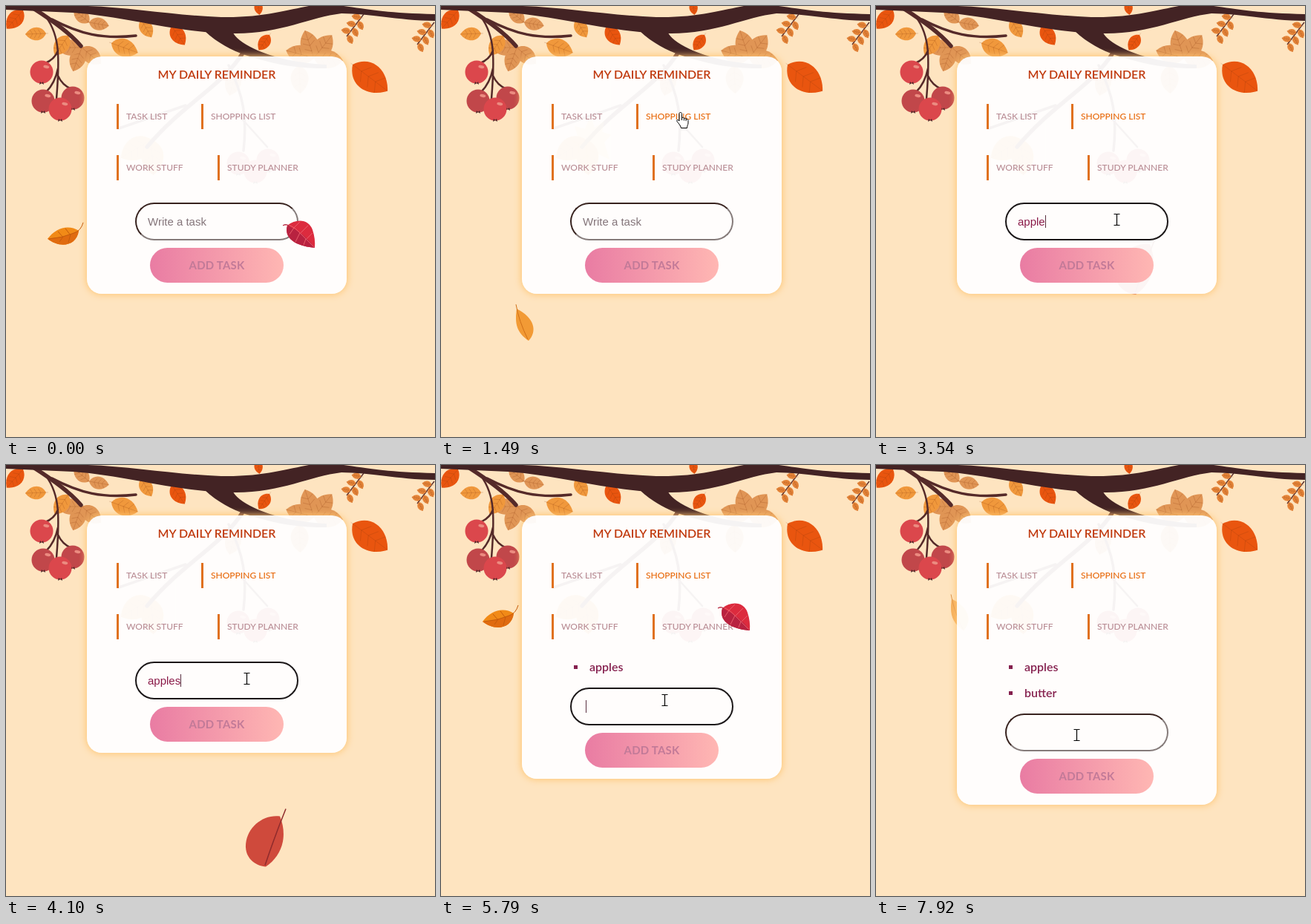
Animation, 578 px wide and 581 px high, one loop 7.99 s. Source, as an HTML page:

```html
<!DOCTYPE html>
<html lang="en">
<head>
<meta charset="utf-8">
<title>Daily reminder</title>
<style>
html, body { margin: 0; width: 100%; height: 100%; overflow: hidden; background: #fee4c0; }
body { position: relative; font-family: Lato, sans-serif; }
body > *, #form > * { position: absolute; box-sizing: border-box; white-space: nowrap; }
svg { left: 0; top: 0; width: 578px; height: 581px; overflow: hidden; }

#card { left: 109px; top: 68px; width: 350px; height: 320px; border-radius: 20px;
  background: rgba(255, 255, 255, .945); box-shadow: 0 0 10px 1px #ffc673; }
h1 { margin: 0; left: 109px; top: 80px; width: 350px; text-align: center;
  font-size: 16px; line-height: 24px; font-weight: 600; color: #c0390d; }
.tab { height: 34px; padding-left: 10px; border-left: 3px solid #e0711f;
  font-size: 12px; line-height: 34px; font-weight: 500; color: #b98d95; }
.tab.on { color: #e8690b; }

.item { left: 200px; font-size: 16px; line-height: 24px; font-weight: 600; color: #85204e; }
.item::before { content: ""; position: absolute; left: -21px; top: 10px; width: 5px; height: 5px; background: #85204e; }

#form { left: 0; top: 265px; }
#field { left: 174px; top: 0; width: 220px; height: 51px; padding-left: 15px; border-radius: 26px;
  border: 2px solid; border-color: #38231f #857b7a #857b7a #38231f;
  font: 15px/47px "Liberation Sans", Arial, sans-serif; color: #8a1a48; }
#field.focus { border-color: #1b1718; }
#hint { position: absolute; color: #84757a; }
#text.wavy { text-decoration: underline wavy #d83a4c 1px; text-underline-offset: 1px; }
#caret { display: inline-block; width: 1px; height: 17px; margin-right: -1px; vertical-align: -3px; background: #5a3040; }
#button { left: 194px; top: 61px; width: 180px; height: 47px; border-radius: 24px; text-align: center;
  font-size: 15px; line-height: 47px; font-weight: 700; letter-spacing: .2px; color: #c27a98;
  background: linear-gradient(90deg, #e97ca3, #ffb7b3); }
#button.hover { color: #ad5885; background: linear-gradient(90deg, #e56a9a, #ffb0a9); }
</style>
</head>
<body>
<svg viewBox="0 0 578 581">
  <g id="foliage"></g>
  <g fill="none" stroke="#552a29" stroke-linecap="round">
    <path stroke-width="5.5" d="M35 2C60 18 85 35 101 54M320 62C290 110 240 130 190 190"/>
    <path stroke-width="3.5" d="M62 18C100 38 130 45 175 40M242 134L152 165M300 80C320 120 325 150 320 195"/>
    <path stroke-width="2.5" d="M50 10C72 35 73 65 68 125M70 60Q66 72 51 78M70 84Q66 104 54 116M69 92Q76 108 89 112M316 150L352 190"/>
  </g>
  <g fill="#432324">
    <path d="M0 0H110C170 2 230 13 290 15C345 16 380 5 408 0H455C480 3 510 10 578 11V20C530 20 490 10 452 10C410 15 370 37 310 37C230 37 170 15 90 9L0 5Z"/>
    <path d="M268 34C285 50 305 60 322 66C370 82 400 84 432 84V79C400 78 360 70 335 58C318 50 308 42 305 34Z"/>
  </g>
  <g id="berries"></g>
  <g id="slim">
    <path fill="#f29a35" d="M102 158C99 178 102 190 118 201C130 188 126 170 102 158Z"/>
    <path fill="none" stroke="#cf6f18" d="M101 152Q105 175 117 199"/>
  </g>
  <path id="maple" fill="#f9a021" d="M201 335L207 350L220 342L217 356L229 360L220 370L227 393L212 386L193 402L190 388L178 397L180 380L172 368L184 362L180 348L194 352Z"/>
  <g id="broad">
    <path fill="#cf4a3c" d="M369 163C345 160 322 180 323 205C324 222 338 230 350 231C372 216 380 190 369 163Z"/>
    <path fill="none" stroke="#8f2b2c" stroke-width="1.5" d="M377 153Q362 190 349 229"/>
  </g>
</svg>

<div id="card"></div>
<h1>MY DAILY REMINDER</h1>
<div class="tab" style="left:149px;top:132px">TASK LIST</div>
<div class="tab" id="shopping" style="left:263px;top:132px">SHOPPING LIST</div>
<div class="tab" style="left:149px;top:201px">WORK STUFF</div>
<div class="tab" style="left:285px;top:201px">STUDY PLANNER</div>
<div class="item" style="top:260px">apples</div>
<div class="item" style="top:295px">butter</div>
<div id="form">
  <div id="field"><span id="hint">Write a task</span><span id="text"></span><span id="caret"></span></div>
  <div id="button">ADD TASK</div>
</div>

<svg viewBox="0 0 578 581">
  <g id="pair" fill="none">
    <path fill="#f18a17" d="M98 303C84 294 67 299 56 314C70 326 95 326 98 303Z"/>
    <path fill="#e06b10" d="M98 303Q80 312 56 314C70 326 95 326 98 303Z"/>
    <path stroke="#c55c0c" d="M104 292Q101 303 92 306Q76 313 58 314M86 308L80 300M76 311L70 304M87 308L84 319M77 311L72 318"/>
    <path fill="#dc2b3e" d="M379 296C393 285 409 289 413 302Q417 314 416 326C398 325 373 317 379 296Z"/>
    <path fill="#b82240" d="M379 296Q402 306 416 326C398 325 373 317 379 296Z"/>
    <path stroke="#ee6570" stroke-width=".9" d="M373 296Q383 292 396 306L415 325M388 299L396 291M397 306L407 296M405 314L413 306M388 299L382 308M396 306L390 318M404 314L401 322"/>
    <path stroke="#a51f3a" d="M373 296Q377 293 382 297"/>
  </g>
  <g id="pointer" stroke="#000" fill="#fff">
    <path id="arrow" d="M0 0V16L4 12.5L6.5 18.5L9 17.5L6.5 11.5H12Z"/>
    <path id="hand" transform="translate(-5)" d="M5.5 .5C7 .5 7.5 1.3 7.5 2.5V7.5C8.5 7 10 7.2 10.3 8.3C11.5 7.8 13 8.3 13.1 9.4C14.5 9 16 10 16 11.5V15C16 17 14.5 18 14.5 21.5H6.5C6 18 3 15.5 1 12.5C0 11 1.8 9.8 3.2 11L4 12V2.5C4 1.3 4.2 .5 5.5 .5ZM7.5 7V11M10.4 8V11.5M13.1 9V12"/>
    <path id="beam" fill="none" stroke-width="1.2" d="M-4-7.5h3q1 0 1 1q0-1 1-1h3M0-7V7M-4 7.5h3q1 0 1-1q0 1 1 1h3"/>
  </g>
</svg>

<script>
const LOOP = 7990;
const ROW = 35;
const $ = id => document.getElementById(id);
const clamp = v => Math.min(1, Math.max(0, v));
const smooth = v => v * v * (3 - 2 * v);
const show = (el, on) => { el.style.visibility = on ? 'visible' : 'hidden'; };

// One leaf growing from (x, y) in a direction given in degrees.
function leaf(x, y, angle, length, color) {
  const w = length * .42, vein = [.25, .45, .65].map(a =>
    `M${length * (a + .13)} ${w * .5}L${length * a} 0L${length * (a + .13)} ${-w * .5}`).join('');
  $('foliage').insertAdjacentHTML('beforeend', `<g transform="translate(${x} ${y}) rotate(${angle})">
    <path fill="${color}" d="M0 0C${length * .2} ${w} ${length * .7} ${w} ${length} 0C${length * .7} ${-w} ${length * .2} ${-w} 0 0"/>
    <path fill="none" stroke="#8a3a10" stroke-opacity=".3" stroke-width=".7" d="M-3 0H${length}${vein}"/></g>`);
}

function fan(x, y, angle, spread, count, length, color) {
  for (let i = 0; i < count; i++) leaf(x, y, angle + spread * (i / (count - 1) - .5), length, color);
}

// Thin hanging twig with leaves on alternating sides.
function sprig(x, y) {
  $('foliage').insertAdjacentHTML('beforeend',
    `<path d="M${x} ${y}l-23 30" fill="none" stroke="#552a29" stroke-width="1.3"/>`);
  for (let i = 1; i <= 6; i++) leaf(x - 3.5 * i, y + 4.7 * i, i % 2 ? 190 : 65, 13, '#e8873a');
}

const TAN = '#e09555', AMBER = '#f0983c', RED = '#e9550f';
fan(112, 22, -65, 150, 2, 27, TAN);
fan(102, 56, 110, 140, 3, 34, TAN);
fan(415, 70, -80, 170, 4, 39, TAN);
leaf(395, 80, 88, 38, TAN);
leaf(310, 88, 105, 34, TAN);
leaf(54, 37, 178, 28, AMBER);
leaf(84, 40, 125, 32, AMBER);
leaf(142, 50, 20, 38, AMBER);
leaf(182, 18, 60, 28, AMBER);
fan(196, 180, 118, 62, 2, 48, AMBER);
leaf(23, 6, 132, 33, RED);
leaf(223, 27, 55, 31, RED);
leaf(355, 39, 125, 25, RED);
leaf(339, -6, 82, 18, RED);
leaf(467, 79, 37, 59, RED);
sprig(482, 11);
sprig(577, 22);

function berry(x, y, color) {
  $('berries').insertAdjacentHTML('beforeend', `<g transform="translate(${x} ${y})">
    <circle r="15.5" fill="${color}"/><ellipse cx="5" cy="-8" rx="4" ry="2" fill="#eb8b80" transform="rotate(10)"/>
    <path d="M-3 17l1-4l2 2l2-2l1 4l-3-2z" fill="#432324"/></g>`);
}
function bunch(x, y) {
  for (const side of [-1, 1]) berry(x + 20 * side, y - 2 * side, '#c1474a');
  berry(x + 3, y + 13, '#db474c');
}
berry(48, 89, '#db474c');
bunch(70, 126);
bunch(333, 210);

// Leaves drop with constant acceleration, from `lift` above the drawn pose, fading in after `wait`.
const falling = {
  pair: { starts: [-1492, 4654], lift: 245, wait: 800 },
  slim: { starts: [-240, 6960], lift: 79, wait: 800 },
  maple: { starts: [1100], lift: 203, wait: 300 },
  broad: { starts: [2050], lift: 13, wait: 0, pull: 7.7e-5 }
};
function drop(name, t) {
  const { starts, lift, wait, pull = 1.1e-4 } = falling[name];
  const age = t - (starts.findLast(s => s <= t) ?? Infinity);
  $(name).style.opacity = clamp((age - wait) / 220);
  $(name).setAttribute('transform', `translate(0 ${age > 0 ? pull * age * age - lift : 0})`);
}

const KEY_GAP = 172;
const tasks = [
  { word: 'apples', focus: 2260, type: 2845, add: 4890 },
  { word: 'butter', focus: 5650, type: 5950, add: 7750 }
];

const moves = [
  { at: 100, time: 380, x: 322, y: 143 },
  { at: 1700, time: 400, x: 324.5, y: 288 },
  { at: 4170, time: 280, x: 293, y: 365 },
  { at: 4990, time: 260, x: 301.5, y: 317 },
  { at: 7230, time: 320, x: 270.5, y: 364 }
];
function pointerAt(t) {
  let x = 590, y = 100;
  for (const m of moves) {
    const k = smooth(clamp((t - m.at) / m.time));
    x += (m.x - x) * k;
    y += (m.y - y) * k;
  }
  return [x, y];
}
function over(id, x, y) {
  const box = $(id).getBoundingClientRect();
  return x >= box.left && x <= box.right && y >= box.top && y <= box.bottom;
}

function render(t) {
  const count = tasks.filter(task => t >= task.add).length;
  const task = tasks[count];
  const focused = !!task && t >= task.focus;
  const keys = task ? Math.min(task.word.length, Math.max(0, Math.floor((t - task.type) / KEY_GAP) + 1)) : 0;
  const idle = !task ? 0 : t - (keys ? task.type + (keys - 1) * KEY_GAP : task.focus);

  $('card').style.height = 320 + ROW * count + 'px';
  $('form').style.top = 265 + ROW * count + 'px';
  document.querySelectorAll('.item').forEach((el, i) => show(el, i < count));
  $('shopping').classList.toggle('on', t >= 1000);
  $('field').classList.toggle('focus', focused);
  $('text').textContent = task ? task.word.slice(0, keys) : '';
  $('text').classList.toggle('wavy', keys > 0 && idle > 800);
  show($('hint'), !count && !keys);
  show($('caret'), focused && idle % 1100 < 550);
  $('caret').style.marginLeft = count && !keys ? '4px' : 0;

  const [x, y] = pointerAt(t);
  const onButton = over('button', x, y);
  const kind = onButton || over('shopping', x, y) ? 'hand' : over('field', x, y) ? 'beam' : 'arrow';
  $('pointer').setAttribute('transform', `translate(${x} ${y})`);
  $('button').classList.toggle('hover', onButton);
  for (const name of ['arrow', 'hand', 'beam']) show($(name), name === kind);
  for (const name in falling) drop(name, t);
}

let start;
function frame(now) {
  start ??= now;
  render((now - start) % LOOP);
  requestAnimationFrame(frame);
}
render(0);
requestAnimationFrame(frame);
</script>
</body>
</html>
```
